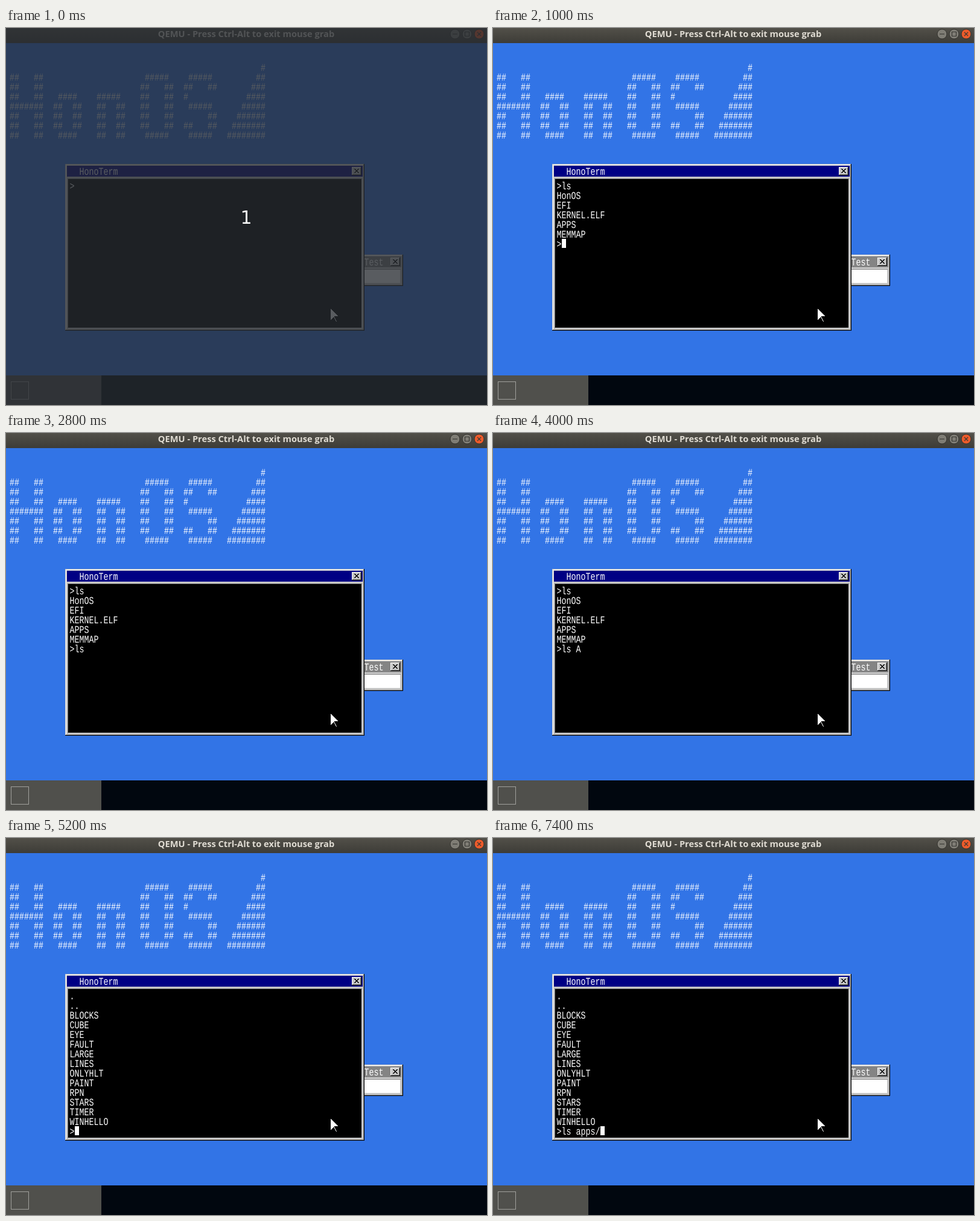
Recreate the animation shown at these times as an HTML page. Size 797 by 624 pixels, loop 8 s.

```html
<!DOCTYPE html>
<html lang="en">
<head>
<meta charset="utf-8">
<title>HonOS terminal</title>
<style>
  html, body { margin: 0; width: 100%; height: 100%; overflow: hidden; background: #000; }
  svg { display: block; width: 797px; height: 624px; }
  rect { shape-rendering: crispEdges; }
  text { white-space: pre; }
  .mono { font: 13.333px "Liberation Mono", monospace; fill: #fff; text-rendering: geometricPrecision; }
  .caption { font: bold 14.67px "Open Sans", "Noto Sans", sans-serif; fill: #dfdbd2; text-anchor: middle; }
  .count { font: 30px "DejaVu Sans", sans-serif; fill: #fff; text-anchor: middle; }
</style>
</head>
<body>
<svg id="stage" viewBox="0 0 797 624" xmlns="http://www.w3.org/2000/svg">
  <defs>
    <linearGradient id="bar" x1="0" y1="0" x2="0" y2="1">
      <stop offset="0" stop-color="#525049"/>
      <stop offset="1" stop-color="#3d3c37"/>
    </linearGradient>
  </defs>
</svg>
<script>
const LOOP = 8000;
const COL = 8, ROW = 16;
const LIGHT = '#c6c6c6', DARK = '#848484', BLACK = '#000', WHITE = '#fff';
const stage = document.getElementById('stage');

function add(tag, attrs, parent = stage) {
  const node = document.createElementNS('http://www.w3.org/2000/svg', tag);
  for (const key in attrs) node.setAttribute(key, attrs[key]);
  return parent.appendChild(node);
}

function box(x, y, width, height, fill, parent) {
  return add('rect', { x, y, width, height, fill }, parent);
}

// One line of the tall 8 x 16 console face; x, y is the corner of its first cell.
function line(x, y, str = '') {
  const node = add('text', { class: 'mono', transform: `translate(${x} ${y + 13.5}) scale(1 1.3)` });
  node.textContent = str;
  return node;
}

function closeButton(x, y) {
  box(x, y, 16, 14, BLACK);
  box(x, y, 15, 13, WHITE);
  box(x + 1, y + 1, 14, 12, DARK);
  box(x + 1, y + 1, 13, 11, LIGHT);
  box(x + 15, y, 1, 14, BLACK);
  for (let i = 0; i < 7; i++) {
    box(x + 4 + i, y + 3 + i, 2, 1, BLACK);
    box(x + 10 - i, y + 3 + i, 2, 1, BLACK);
  }
}

function appWindow(x, y, w, h, title, barColor, inner) {
  box(x, y, w, h, BLACK);
  box(x, y, w - 1, h - 1, LIGHT);
  box(x + 1, y + 1, w - 2, h - 2, DARK);
  box(x + 1, y + 1, w - 3, h - 3, WHITE);
  box(x + 2, y + 2, w - 4, h - 4, LIGHT);
  box(x + 3, y + 3, w - 6, 18, barColor);
  line(x + 23.5, y + 4, title);
  closeButton(x + w - 21, y + 5);
  box(x + 4, y + 24, w - 8, h - 28, DARK);
  box(x + 5, y + 25, w - 9, h - 29, LIGHT);
  box(x + 5, y + 25, w - 10, h - 30, inner);
}

function frameButton(x, fill, mark) {
  add('circle', { cx: x, cy: 10, r: 8, fill, stroke: '#33322e', 'stroke-width': 1 });
  add('path', { d: mark, transform: `translate(${x} 10)`, fill: 'none', stroke: '#3a3934', 'stroke-width': 1.2 });
}

function banner() {
  const rows = [
    '',
    '##   ##                     #####    #####',
    '##   ##                    ##   ##  ##   ##',
    '##   ##   ####    #####    ##   ##  #',
    '#######  ##  ##   ##  ##   ##   ##   #####',
    '##   ##  ##  ##   ##  ##   ##   ##       ##',
    '##   ##  ##  ##   ##  ##   ##   ##  ##   ##',
    '##   ##   ####    ##  ##    #####    #####'
  ];
  rows.forEach((s, i) => line(6, 57 + i * ROW, s.padEnd(52 - i) + '#'.repeat(i + 1)));
}

function pointer(x, y) {
  const g = add('g', { transform: `translate(${x} ${y})` });
  add('path', {
    d: 'M0 0L15 14V15H8V16L12 24H9L6 17L0 22Z',
    fill: BLACK
  }, g);
  for (let r = 2; r < 14; r++) box(1, r, r - 1, 1, WHITE, g);
  box(1, 14, 6, 2, WHITE, g);
  for (let r = 16; r < 20; r++) box(1, r, 20 - r, 1, WHITE, g);
  for (let r = 16; r < 23; r++) box(7 + ((r - 16) >> 1), r, 1, 1, WHITE, g);
}

// Desktop
box(0, 0, 797, 624, '#3274e6');
box(0, 0, 797, 25, 'url(#bar)');
add('text', { class: 'caption', x: 398, y: 15 }).textContent = 'QEMU - Press Ctrl-Alt to exit mouse grab';
frameButton(744, '#7f7d75', 'M-4 0H4');
frameButton(764, '#7f7d75', 'M-3.5 -3.5H3.5V3.5H-3.5Z');
frameButton(784, '#ec5b2b', 'M-3 -3L3 3M3 -3L-3 3');
banner();
box(0, 575, 797, 49, '#01070f');
box(0, 575, 158, 49, '#50504c');
box(8, 585, 30, 30, '#a0a09c');
box(9, 586, 28, 28, '#50504c');

// Windows
appWindow(498, 375, 160, 52, 'Text Box Test', DARK, WHITE);
appWindow(98, 225, 496, 276, 'HonoTerm', '#000084', BLACK);
const TERM = { x: 106, y: 253 };
const lines = Array.from({ length: 15 }, (_, i) => line(TERM.x - 0.5, TERM.y + i * ROW));
const caret = box(0, 0, 7, 15, WHITE);
pointer(537, 463);

// Countdown veil
const veil = add('g', {});
box(0, 0, 797, 624, '#272b31', veil).setAttribute('opacity', 0.77);
add('text', { class: 'count', x: 398, y: 324 }, veil).textContent = '1';

const root = ['>ls', 'HonOS', 'EFI', 'KERNEL.ELF', 'APPS', 'MEMMAP'];
const apps = ['.', '..', 'BLOCKS', 'CUBE', 'EYE', 'FAULT', 'LARGE', 'LINES', 'ONLYHLT',
  'PAINT', 'RPN', 'STARS', 'TIMER', 'WINHELLO'];

// start ms, lines above the prompt, typed text, caret shown
const steps = [
  [0, [], '', 0],
  [500, [], 'l', 1],
  [600, [], 'ls', 1],
  [700, [], 'ls', 0],
  [1000, root, '', 1],
  [2000, root, '', 0],
  [2200, root, '', 1],
  [2500, root, 'ls', 1],
  [2600, root, 'ls ', 1],
  [2800, root, 'ls ', 0],
  [3200, root, 'ls A', 1],
  [4000, root, 'ls A', 0],
  [4100, root, 'ls ', 1],
  [4400, root, 'ls a', 1],
  [4600, root, 'ls ap', 1],
  [4800, root, 'ls app', 1],
  [5000, root, 'ls apps', 1],
  [5200, apps, '', 1],
  [6000, apps, '', 0],
  [6500, apps, '', 1],
  [6700, apps, '', 0],
  [7000, apps, 'ls apps', 1],
  [7400, apps, 'ls apps/', 1]
];

let shown = null;

function show(step) {
  if (step === shown) return;
  shown = step;
  const [, above, typed, on] = step;
  const text = [...above, '>' + typed];
  lines.forEach((node, i) => { node.textContent = text[i] || ''; });
  caret.setAttribute('x', TERM.x + (typed.length + 1) * COL);
  caret.setAttribute('y', TERM.y + above.length * ROW);
  caret.setAttribute('visibility', on ? 'visible' : 'hidden');
}

function draw(now) {
  const t = now % LOOP;
  veil.setAttribute('visibility', t < 100 ? 'visible' : 'hidden');
  show(steps.findLast(s => s[0] <= t));
}

let start = null;
function tick(now) {
  if (start === null) start = now;
  draw(now - start);
  requestAnimationFrame(tick);
}
draw(0);
requestAnimationFrame(tick);
</script>
</body>
</html>
```
